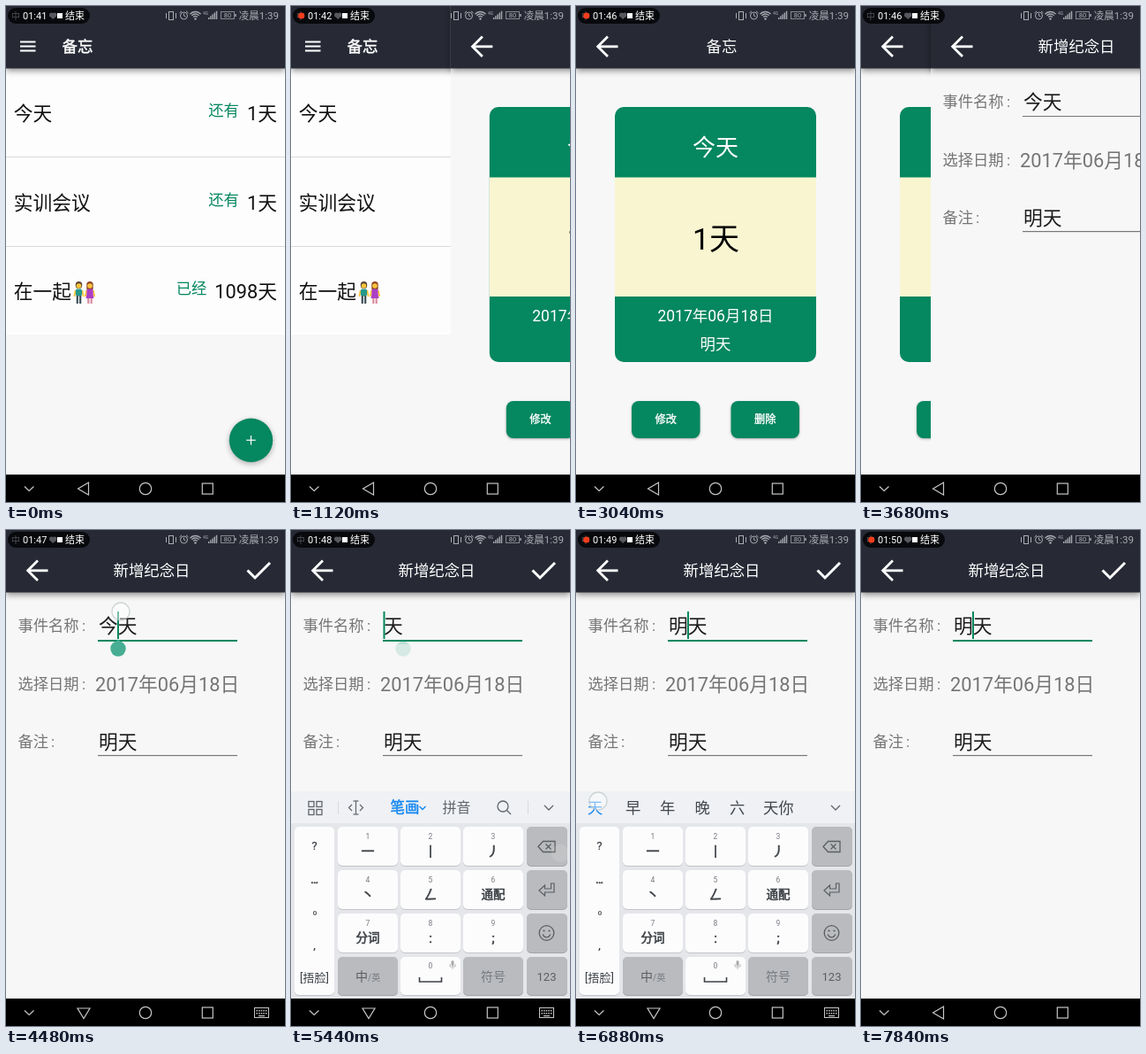
Animation of 316 by 560 pixels, one loop 8 s. Source, as an HTML page with a canvas:

```html
<!DOCTYPE html>
<html lang="zh-CN">
<head>
<meta charset="utf-8">
<style>
html, body { margin: 0; width: 100%; height: 100%; overflow: hidden; background: #f7f7f7; }
canvas { display: block; width: 316px; height: 560px; }
</style>
</head>
<body>
<canvas id="stage"></canvas>
<script>
const W = 316, H = 560, LOOP = 8000, STEP = 160;
const GREEN = '#05875f', DARK = '#272a35', PAGE = '#f7f7f7', GREY = '#757575';
const FONT = 'Roboto, "Noto Sans CJK SC", "Noto Sans CJK", sans-serif';
const canvas = document.getElementById('stage');
const c = canvas.getContext('2d');
const dpr = window.devicePixelRatio || 1;
canvas.width = W * dpr;
canvas.height = H * dpr;

// ---------- helpers ----------
function rect(x, y, w, h, fill) {
  c.fillStyle = fill;
  c.fillRect(x, y, w, h);
}
function round(x, y, w, h, r, fill) {
  c.beginPath();
  c.roundRect(x, y, w, h, r);
  c.fillStyle = fill;
  c.fill();
}
function disc(x, y, r, fill) {
  c.beginPath();
  c.arc(x, y, r, 0, Math.PI * 2);
  c.fillStyle = fill;
  c.fill();
}
function ring(x, y, r, color, w = 1) {
  c.beginPath();
  c.arc(x, y, r, 0, Math.PI * 2);
  c.strokeStyle = color;
  c.lineWidth = w;
  c.stroke();
}
function line(points, color, w = 1, closed = false) {
  c.beginPath();
  for (let i = 0; i < points.length; i += 2) c.lineTo(points[i], points[i + 1]);
  if (closed) c.closePath();
  c.strokeStyle = color;
  c.lineWidth = w;
  c.stroke();
}
function box(x, y, w, h, color, lw = 1) {
  c.strokeStyle = color;
  c.lineWidth = lw;
  c.strokeRect(x, y, w, h);
}
// bold > 0 thickens the glyphs by that many pixels
function text(s, x, cy, size, color, align = 'left', bold = 0) {
  c.font = `${size}px ${FONT}`;
  c.textAlign = align;
  c.fillStyle = color;
  const y = cy + size * 0.35;
  c.fillText(s, x, y);
  if (!bold) return;
  c.strokeStyle = color;
  c.lineWidth = bold;
  c.lineJoin = 'round';
  c.strokeText(s, x, y);
  c.lineJoin = 'miter';
}
function shadowed(blur, dy, alpha, draw) {
  c.save();
  c.shadowColor = `rgba(0,0,0,${alpha})`;
  c.shadowBlur = blur * dpr;
  c.shadowOffsetY = dy * dpr;
  draw();
  c.restore();
}
const during = (t, a, b) => t >= a && t < b;
const clamp = v => Math.max(0, Math.min(1, v));
const slideIn = (t, start, len) => W * (1 - clamp((t - start) / len)) ** 2;
const latest = (t, list) => list.filter(e => t >= e[0]).pop()[1];

// ---------- timeline ----------
const SECONDS = [[0, 41], [800, 42], [1280, 43], [2240, 44], [2560, 45], [3040, 46],
  [4000, 47], [5120, 48], [6240, 49], [7520, 50]];
const DOT_ON = [[800, 1280], [1920, 2240], [2560, 3520], [4000, 4320], [4800, 5280],
  [5760, 6080], [6560, 7040], [7360, 8000]];
// start, end, x, y of each tap
const TAPS = [[640, 960, 150, 122], [2240, 2560, 102, 467], [4160, 4640, 130, 92],
  [5120, 5440, 298, 361], [5600, 5760, 160, 360], [5760, 5920, 160, 408],
  [5920, 6080, 88, 360], [6080, 6240, 88, 360], [6560, 7040, 25, 306], [7200, 7360, 26, 543]];
const BAR = [[0, ''], [5600, '上 是 日 中 口 同你'], [5760, '日 中 口 只 里 国内'],
  [5920, '日 里 早 果 晚 日子'], [6080, '明 时 是 星 晚 明天'], [6720, '天 早 年 晚 六 天你']];

// ---------- chrome ----------
function header(title, centered) {
  shadowed(7, 2, 0.45, () => rect(0, 0, W, 70.5, DARK));
  if (centered) {
    text(title, 165, 46, 17.4, '#fff', 'center');
    line([36, 34.5, 24.7, 45.8, 36, 57], '#fff', 2.8);
    line([24.7, 45.8, 47.5, 45.8], '#fff', 2.8);
  } else {
    text(title, 63.5, 46, 17.4, '#fff', 'left', 0.5);
    for (const y of [39.5, 44.5, 49.5]) rect(16, y, 17.5, 2, '#fff');
  }
}

function statusBar(t) {
  const g = '#a9abb2';
  round(2, 2, 93, 18, 9, '#08090c');
  text('中', 6, 11, 10, '#50525a');
  if (DOT_ON.some(([a, b]) => during(t, a, b))) disc(11.8, 11, 3.6, '#f23d1d');
  text('01:' + latest(t, SECONDS), 19, 11, 11, '#fff');
  disc(51.5, 10, 2.5, '#56585e');
  disc(55, 10, 2.5, '#56585e');
  c.beginPath();
  c.moveTo(49, 11); c.lineTo(53.2, 15); c.lineTo(57.5, 11);
  c.fill();
  rect(58, 8, 6, 6, '#fff');
  text('结束', 67, 11, 11, '#fff');

  box(184.5, 6.5, 5, 9, g);
  for (const x of [181.5, 192.5]) line([x, 8, x, 14], g);
  ring(201.5, 11, 4, g);
  line([201.5, 8.5, 201.5, 11, 203.5, 12], g);
  line([196.5, 8, 199, 5.8], g);
  line([204, 5.8, 206.5, 8], g);
  for (const r of [3, 5.5, 8]) {
    c.beginPath();
    c.arc(214.5, 14.5, r, -Math.PI * 0.77, -Math.PI * 0.23);
    c.strokeStyle = g;
    c.lineWidth = 1.3;
    c.stroke();
  }
  disc(214.5, 14.5, 1.2, g);
  text('4G', 223, 8, 5, g);
  for (let i = 0; i < 5; i++) rect(229 + i * 2.2, 13 - i * 1.8, 1.4, 2 + i * 1.8, g);
  box(243.5, 6.5, 15, 8, '#85878e');
  rect(259, 9, 2, 3, '#85878e');
  text('80', 251, 10.5, 7.5, g, 'center');
  text('凌晨1:39', 309, 11, 11.5, g, 'right');
}

function navBar(typing) {
  const g = '#c6c6c6';
  rect(0, 529, W, 31, '#000');
  line([21, 542.5, 26.2, 547.5, 31.5, 542.5], g, 1.2);
  line(typing ? [81, 540, 95, 540, 88, 551.5] : [93.5, 538, 93.5, 552, 81.5, 545], g, 1.2, true);
  ring(158, 545, 6.7, g, 1.2);
  box(222.3, 539, 12, 12, g, 1.2);
  if (!typing) return;
  box(281.5, 539.5, 16, 11, g);
  for (let i = 0; i < 5; i++) {
    rect(283.5 + i * 2.6, 542, 1.5, 1.5, g);
    rect(283.5 + i * 2.6, 545, 1.5, 1.5, g);
  }
  rect(286, 548, 7, 1.2, g);
}

// ---------- pages ----------
function person(x, y, hair, shirt, legs, skirt) {
  const hip = skirt ? 19 : 16;
  round(x - 3.7, y, 7.4, skirt ? 11 : 8, 3.5, hair);
  disc(x, y + 5, 2.8, '#fcc43a');
  for (const side of [-1, 1])
    line([x + side * 3.8, y + 10, x + side * 5.2, y + 17], '#fcc43a', 1.8);
  round(x - 3.6, y + 8.5, 7.2, 8, 2, shirt);
  if (skirt) {
    c.beginPath();
    c.moveTo(x - 3, y + 13); c.lineTo(x + 3, y + 13);
    c.lineTo(x + 4.6, y + hip); c.lineTo(x - 4.6, y + hip);
    c.fill();
  }
  rect(x - 2.8, y + hip, 2.2, 25 - hip, legs);
  rect(x + 0.6, y + hip, 2.2, 25 - hip, legs);
}

function listPage(t) {
  rect(0, 0, W, H, PAGE);
  rect(0, 70, W, 301, '#fdfdfd');
  if (during(t, 640, 1120)) rect(0, 70, W, 100, 'rgba(0,0,0,.08)');
  const rows = [['今天', '还有', '1天', 264], ['实训会议', '还有', '1天', 264],
    ['在一起', '已经', '1098天', 227.5]];
  rows.forEach(([name, tag, days, right], i) => {
    const y = 121.5 + i * 100.5;
    text(name, 8.7, y, 21.75, '#111');
    text(tag, right, y - 3.3, 17.4, GREEN, 'right');
    text(days, 307, y, 21.75, '#111', 'right');
    if (i < 2) rect(0, 170 + i * 101, W, 1, '#d9d9d9');
  });
  person(82.5, 311, '#5b4638', '#24998b', '#3f5058', false);
  person(95, 311, '#8d4526', '#ab3fc4', '#d98ba0', true);
  shadowed(6, 2, 0.3, () => disc(277.5, 490.2, 24.7, GREEN));
  rect(272.2, 489.6, 10.5, 1.2, '#fff');
  rect(276.9, 485, 1.2, 10.5, '#fff');
  header('备忘', false);
}

function detailPage(t) {
  rect(0, 0, W, H, PAGE);
  round(44, 114, 228, 288, 10, GREEN);
  rect(44, 193.5, 228, 134.5, '#f9f5d0');
  text('今天', 158, 160, 26, '#fff', 'center');
  text('1天', 158.5, 263, 34, '#000', 'center');
  text('2017年06月18日', 158, 350, 17.5, '#fff', 'center');
  text('明天', 158, 382, 17.4, '#fff', 'center');
  [['修改', 63], ['删除', 175.5]].forEach(([label, x], i) => {
    const pressed = i === 0 && during(t, 2240, 2560);
    shadowed(3, 1, 0.3, () => round(x, 446, 77.5, 42, 8, pressed ? '#3a9f7f' : GREEN));
    text(label, x + 38.7, 467, 12.2, '#fff', 'center', 0.4);
  });
  header('备忘', true);
}

function editPage(t) {
  rect(0, 0, W, H, PAGE);
  const focused = t >= 4160;
  const name = t < 5280 ? '今天' : t < 6720 ? '天' : '明天';
  const caret = name === '天' ? 105.5 : 127;
  [['事件名称', 88, 108], ['选择日期', 88, 174], ['备注', 53, 239]].forEach(([label, x, y]) => {
    text(label, 13.5, y, 17.3, GREY);
    text(':', x - 2, y, 17.3, GREY);
  });
  text(name, 105, 108, 21.75, '#1c1c1c');
  text('2017年06月18日', 101, 174, 21.8, GREY);
  text('明天', 105, 239, 21.75, '#1c1c1c');
  rect(104, 124, 158, focused ? 2 : 1, focused ? GREEN : '#777');
  rect(104, 254, 158, 1.2, '#777');
  if (focused) rect(caret - 1, 92, 2, 31, GREEN);
  if (during(t, 4160, 5600)) {
    c.globalAlpha = t < 5280 ? 1 : t < 5440 ? 0.6 : 0.18;
    disc(127, 134, 8.7, '#47ae93');
    c.beginPath();
    c.moveTo(127, 123.5); c.lineTo(133, 129); c.lineTo(121, 129);
    c.fill();
    c.globalAlpha = 1;
  }
  header('新增纪念日', true);
  line([273.5, 45.5, 282, 54, 299, 37], '#fff', 3);
}

// ---------- keyboard ----------
function toolbar(t) {
  const g = '#60656c', blue = '#1688f0';
  rect(0, 295, W, 36, '#eff1f4');
  const words = latest(t, BAR);
  const cx = words ? 294 : 292;
  line([cx - 5, 311, cx, 316, cx + 5, 311], g, 1.3);
  if (words) {
    const xs = [13, 56, 95, 134.5, 174, 212];
    words.split(' ').forEach((w, i) => text(w, xs[i], 313.7, 17.3, i ? '#42474d' : blue));
    return;
  }
  for (const x of [53, 268]) rect(x, 306, 1, 15, '#d8dade');
  for (const x of [20, 29]) for (const y of [306.5, 315.5]) box(x, y, 6, 6, g, 1.3);
  line([70.5, 306, 76.5, 306], g, 1.2);
  line([73.5, 306, 73.5, 321], g, 1.2);
  line([70.5, 321, 76.5, 321], g, 1.2);
  line([69, 310, 65.5, 313.5, 69, 317], g, 1.2);
  line([78, 310, 81.5, 313.5, 78, 317], g, 1.2);
  text('笔画', 112.5, 313.7, 16.5, blue, 'left', 0.5);
  line([145.5, 312, 149, 315.5, 152.5, 312], blue, 1.4);
  text('拼音', 171.5, 313.7, 16, g);
  ring(240, 312, 6, g, 1.3);
  line([244.5, 316.5, 249, 321], g, 1.3);
}

function key(x, y, w, h, fill, edge = '#c3c5c9') {
  round(x, y + 1, w, h, 5, edge);
  round(x, y, w, h, 5, fill);
}

function keyboard(t) {
  const ink = '#3c4045', icon = '#5b5e62', soft = '#777b80', white = '#fcfcfd';
  const dim = '#b9bbbe', dimEdge = '#a2a4a8';
  const rows = [335, 384, 433, 482], cols = [53, 124, 195];
  rect(0, 331, W, 229, '#e4e6ea');
  toolbar(t);
  key(4, 335, 45, 190, white);
  text('?', 26.5, 356, 13, ink, 'center', 0.2);
  text('…', 26.5, 394, 13, ink, 'center', 0.6);
  text('。', 31, 428, 13, ink, 'center', 0.2);
  text(',', 26.5, 468, 13, ink, 'center', 0.2);
  text('[捂脸]', 26.5, 505, 13, ink, 'center');

  const taps = [[1, 5600, 5760], [4, 5760, 5920], [0, 5920, 6240]];
  ['一', '丨', '丿', '丶', 'ㄥ', '通配', '分词', ':', ';'].forEach((s, i) => {
    const x = cols[i % 3], y = rows[Math.floor(i / 3)];
    const down = taps.some(([k, a, b]) => k === i && during(t, a, b));
    key(x, y, 68, 44, down ? '#d2d4d8' : white);
    text(i + 1, x + 34, y + 11.5, 8.5, soft, 'center');
    text(s, x + 34, y + 27.5, s.length > 1 ? 13.5 : 15, ink, 'center', 0.6);
  });

  key(53, 482, 68, 43, dim, dimEdge);
  text('中', 73, 504, 14, icon);
  text('/英', 87, 505, 10, soft);
  key(124, 482, 68, 43, white);
  text('0', 158, 492, 8.5, soft, 'center');
  line([145.5, 505, 145.5, 510, 170.5, 510, 170.5, 505], ink, 1.6);
  round(181.5, 486, 3, 6, 1.5, '#aaa');
  line([180, 490, 180, 493, 186, 493, 186, 490], '#aaa', 0.8);
  line([183, 493, 183, 496], '#aaa', 0.8);
  key(195, 482, 68, 43, dim, dimEdge);
  text('符号', 229, 504, 14, soft, 'center');

  rows.forEach((y, i) => {
    const down = i === 0 && during(t, 5120, 5280);
    key(267, y, 46, i < 3 ? 44 : 43, down ? '#9da0a4' : dim, dimEdge);
  });
  line([280, 357.5, 285.5, 351.5, 299, 351.5, 299, 363.5, 285.5, 363.5], icon, 1.3, true);
  line([288.5, 354.5, 294.5, 360.5], icon, 1.3);
  line([294.5, 354.5, 288.5, 360.5], icon, 1.3);
  line([281, 407, 287.5, 401, 287.5, 405, 294.5, 405, 294.5, 399, 298, 399,
    298, 409, 287.5, 409, 287.5, 413], icon, 1.2, true);
  ring(289.5, 455, 8.3, icon, 1.3);
  disc(286.5, 452.5, 1.1, icon);
  disc(292.5, 452.5, 1.1, icon);
  c.beginPath();
  c.arc(289.5, 455.5, 4.3, 0.2, Math.PI - 0.2);
  c.stroke();
  text('123', 289.5, 504, 13, icon, 'center');
}

function tapMark(t) {
  for (const [a, b, x, y] of TAPS) {
    if (!during(t, a, b)) continue;
    disc(x, y, 10, 'rgba(255,255,255,.45)');
    ring(x, y, 10, 'rgba(190,196,200,.7)', 1.3);
  }
  if (during(t, 5440, 5600)) disc(305, 365, 10, 'rgba(255,255,255,.12)');
}

function shifted(dx, dy, draw, t) {
  c.save();
  c.translate(dx, dy);
  draw(t);
  c.restore();
}

function render(t) {
  c.setTransform(dpr, 0, 0, dpr, 0, 0);
  const detailX = slideIn(t, 960, 657);
  const editX = slideIn(t, 3360, 640);
  if (detailX > 0) listPage(t);
  if (detailX < W && editX > 0) shifted(detailX, 0, detailPage, t);
  if (editX < W) shifted(editX, 0, editPage, t);

  const rise = 1 - (1 - clamp((t - 4480) / 480)) ** 2;
  const fall = clamp((t - 7360) / 480) ** 2;
  const shown = rise * (1 - fall);
  if (shown > 0) shifted(0, 233 * (1 - shown), keyboard, t);

  statusBar(t);
  navBar(during(t, 4320, 7680));
  tapMark(t);
}

const start = performance.now();
function tick() {
  const t = (performance.now() - start) % LOOP;
  render(Math.floor(t / STEP) * STEP); // the screen refreshes every STEP ms
  requestAnimationFrame(tick);
}
tick();
</script>
</body>
</html>
```
